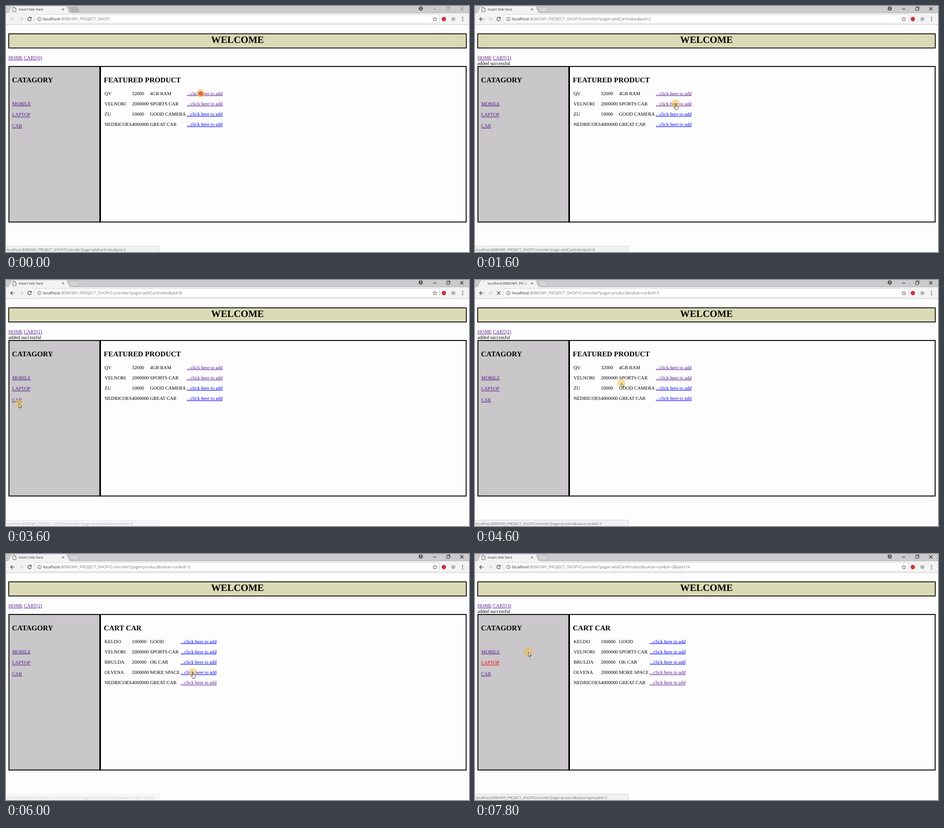
An HTML page for the animation above (8 s loop, 902 by 480 pixels).

```html
<!DOCTYPE html>
<html lang="en">
<head>
<meta charset="utf-8">
<title>Shop demo</title>
<style>
html, body { margin: 0; width: 100%; height: 100%; overflow: hidden; background: #fefdfe; }
svg { display: block; width: 902px; height: 480px; }
text { white-space: pre; text-rendering: geometricPrecision; }
.ui { font-family: "Open Sans", "Noto Sans", sans-serif; }
.page { font: 9.45px "Liberation Serif", "Times New Roman", serif; }
.link { text-decoration: underline; text-decoration-skip-ink: none; }
.h1 { font-size: 18.9px; font-weight: bold; }
.h2 { font-size: 14.15px; font-weight: bold; }
</style>
</head>
<body>
<svg id="stage" viewBox="0 0 902 480" xmlns="http://www.w3.org/2000/svg">
  <defs>
    <linearGradient id="fade">
      <stop offset="0" stop-color="#f4f3f4" stop-opacity="0"/>
      <stop offset="1" stop-color="#f4f3f4"/>
    </linearGradient>
    <clipPath id="tabClip"><rect x="22" y="0" width="82" height="13"/></clipPath>
  </defs>
  <rect width="902" height="480" fill="#fefdfe"/>
  <rect width="902" height="14" fill="#cccacc"/>
  <rect y="13.5" width="902" height="22.5" fill="#f4f3f4"/>
  <path d="M0 13.5H5L11 0H118L124 13.5H902" fill="#f4f3f4" stroke="#aaa8aa" stroke-width=".7"/>
  <path d="M4 14H125" stroke="#f4f3f4" stroke-width="1.5"/>
  <path d="M0 36.4H902" stroke="#c4c2c4" stroke-width=".8"/>
  <rect x="56.5" y="16.7" width="788" height="17" rx="1.5" fill="#fff" stroke="#c9c7c9" stroke-width=".7"/>
  <path d="M109 4.5l4 4m0-4l-4 4" stroke="#444" stroke-width="1"/>
  <g fill="none" stroke="#555" stroke-width="1">
    <circle cx="65" cy="25.5" r="3.6" stroke-width=".9"/>
    <path d="M65 25v2.4M65 23.2v.9"/>
    <path d="M835.500 21.500l1.200 2.700 2.900.3-2.200 1.900.7 2.900-2.600-1.500-2.600 1.500.7-2.900-2.200-1.900 2.900-.3z" stroke-width=".9"/>
  </g>
  <path d="M25 25.500h8m-3.500-3.500l3.500 3.500-3.500 3.500" fill="none" stroke="#d2d0d2" stroke-width="1.1"/>
  <circle cx="853" cy="25.500" r="4.200" fill="#c9333b"/>
  <circle cx="871.500" cy="25.500" r="3.800" fill="#b5b3b5"/>
  <g fill="#555"><circle cx="889.500" cy="22.300" r="1"/><circle cx="889.500" cy="25.500" r="1"/><circle cx="889.500" cy="28.700" r="1"/></g>
  <circle cx="808" cy="5" r="4" fill="#4a4a4a"/>
  <circle cx="808" cy="3.700" r="1.300" fill="#ccc"/>
  <path d="M805.500 7.300q2.500-2 5 0" fill="none" stroke="#ccc"/>
  <g stroke="#000">
    <rect x="5.300" y="54.300" width="891.400" height="27.600" fill="#dadab6" stroke-width="1.600"/>
    <rect x="5.700" y="118" width="177.500" height="303.500" fill="#c9c7c9" stroke-width="1.800"/>
    <rect x="184" y="118" width="712.500" height="303.500" fill="#fefdfe" stroke-width="1.800"/>
    <path d="M183.400 117.200V422.300" stroke-width="3"/>
  </g>
  <g id="live"></g>
</svg>
<script>
const live = document.getElementById('live');
const LOOP = 8000, STEP = 200;
const VISITED = '#551a8b', FRESH = '#0000ee', ACTIVE = '#ff0000';
const HOST = 'localhost', BASE = ':8080/MY_PROJECT_SHOP/', CALL = BASE + 'Controller?page=';

const ADD2 = CALL + 'addCartIndex&pid=2', ADD8 = CALL + 'addCartIndex&pid=8';
const CARS = CALL + 'product&value=car&id=3', LAPTOPS = CALL + 'product&value=laptop&id=2';
const ADD14 = CALL + 'addCartProduct&value=car&id=3&pid=14';
const ADD14_CUT = CALL + 'addCartProduct&value=car&id=3&pid...';

const featured = [
  ['QV', '32000', '4GB RAM'], ['VELNORI', '2000000', 'SPORTS CAR'],
  ['ZU', '10000', 'GOOD CAMERA'], ['NEDRICOES', '4000000', 'GREAT CAR']
];
const cars = [
  ['KELDO', '100000', 'GOOD'], ['VELNORI', '2000000', 'SPORTS CAR'],
  ['BRULDA', '200000', 'OK CAR'], ['OLVENA', '2000000', 'MORE SPACE'],
  ['NEDRICOES', '4000000', 'GREAT CAR']
];

// [request time, ready time, url, cart count, shows message]
const visits = [
  [-1, -1, BASE, 0, false],
  [200, 600, ADD2, 1, true],
  [2000, 2200, ADD8, 2, true],
  [4200, 4800, CARS, 2, false],
  [6400, 6800, ADD14, 3, true]
];

// [time, link under the pointer, opacity]
const hints = [
  [0, ADD2, 1], [800, '', 0], [1000, ADD2, 1], [1200, ADD8, 1],
  [2800, LAPTOPS, 1], [3000, CARS, 1], [3600, CARS, .55], [3800, CARS, 1],
  [4800, '', 0], [6000, ADD14_CUT, .35], [6200, ADD14, 1],
  [6800, '', 0], [7400, LAPTOPS, 1]
];

// [time, x, y]
const path = [
  [0, 379.500, 170.500], [800, 379.500, 170.500], [1200, 391, 190.500], [2000, 391, 190.500],
  [2600, 23, 212], [2800, 22, 214], [3200, 22, 234], [3600, 25, 241], [3800, 22, 235],
  [4200, 22, 235], [4600, 285, 201.500], [4800, 335, 205], [5400, 363, 230],
  [6000, 364, 231], [6600, 364, 231], [7400, 28, 212], [7600, 28, 212], [7800, 104, 191.500]
];
const clicks = [0, 1200, 4000, 6200, 7600];

const last = (list, t) => list.filter(e => e[0] <= t).pop();
const esc = s => s.replace(/&/g, '&amp;');
const text = (x, y, s, attrs = '') => `<text x="${x}" y="${y}" ${attrs}>${esc(s)}</text>`;
const link = (x, y, s, color) => text(x, y, s, `class="link" fill="${color}"`);
const line = (d, color, w = 1.1) => `<path d="${d}" fill="none" stroke="${color}" stroke-width="${w}"/>`;

function pointer(t) {
  const a = last(path, t), b = path.find(p => p[0] > t) || a;
  const k = a === b ? 0 : (t - a[0]) / (b[0] - a[0]);
  return [a[1] + (b[1] - a[1]) * k, a[2] + (b[2] - a[2]) * k];
}

function browser(t, loading, url) {
  const focused = t > 0;
  const ink = focused ? '#333' : '#999';
  const title = loading ? HOST + BASE : 'Insert title here';
  const icon = loading
    ? line('M15.500 4a3.500 3.500 0 0 1 2.500-.6', '#999', 1)
    : '<path d="M13.500 2.500h3.500l2.500 2.500v6h-6z" fill="#fff" stroke="#555" stroke-width=".9"/>' + line('M17 2.500v2.500h2.500', '#555', .8);
  const reload = loading
    ? line('M42.800 22.200l6.500 6.500m0-6.500l-6.500 6.500', '#444', 1.2)
    : line('M49 23.600a3.400 3.400 0 1 0 .3 2.800', '#444', 1.2) + '<path d="M49.800 21.300v3.400h-3.400z" fill="#444"/>';
  return `<g class="ui">
    <path d="M122.500 2H138l5 9.500h-14.500q-2 0-2.800-2z" fill="${focused ? '#d5d3d5' : '#b5b3b5'}" stroke="#aaa8aa" stroke-width=".7"/>
    ${icon}
    <g clip-path="url(#tabClip)">${text(24.500, 9, title, 'font-size="6.75" fill="#333"')}</g>
    ${loading ? '<rect x="90" y="1" width="15" height="11" fill="url(#fade)"/>' : ''}
    ${line('M832 6h6', ink)}${line('M858.500 3h5.500v5.500h-5.500zM860 3v-1.200h5v5', ink, .9)}${line('M885 2.500l6 6m0-6l-6 6', ink)}
    ${line('M17 25.500h-8m3.500-3.500l-3.500 3.500 3.500 3.500', focused ? '#444' : '#d2d0d2')}
    ${reload}
    <text x="72" y="28.300" font-size="7.95" fill="#777"><tspan fill="#222">${HOST}</tspan>${esc(url)}</text>
  </g>`;
}

function page(t, visit) {
  const [, ready, , count, message] = visit;
  const inCars = ready >= 4800;
  const rows = inCars ? cars : featured;
  const seen = i => inCars ? i === 4 || (i === 3 && count === 3) : i < 2;
  const out = [
    text(451, 72.400, 'WELCOME', 'class="h1" text-anchor="middle"'),
    link(4.800, 104, 'HOME', VISITED),
    link(34.800, 104, `CART(${count})`, VISITED),
    message ? text(4.800, 115, 'added successful') : '',
    text(11.800, 148.700, 'CATAGORY', 'class="h2"'),
    text(190.600, 148.700, inCars ? 'CART CAR' : 'FEATURED PRODUCT', 'class="h2"'),
    link(12, 193.700, 'MOBILE', VISITED),
    link(12, 215.300, 'LAPTOP', t >= 7600 ? ACTIVE : VISITED),
    link(12, 236.900, 'CAR', VISITED)
  ];
  rows.forEach(([name, price, note], i) => {
    const y = 173.500 + i * 20.200;
    out.push(text(192, y, name), text(245.300, y, price), text(280.400, y, note),
      link(inCars ? 340.500 : 352.200, y, '...click here to add', seen(i) ? VISITED : FRESH));
  });
  return `<g class="page">${out.join('')}</g>`;
}

function status(t) {
  const [, url, alpha] = last(hints, t);
  if (!url) return '';
  const w = url === ADD14 ? 312 : 299;
  return `<g class="ui" opacity="${alpha}">
    <path d="M-1 468.500H${w - 2}q2 0 2 2V481H-1z" fill="#f2f1f2" stroke="#cccacc" stroke-width=".7"/>
    ${text(1.500, 477.700, HOST + url, 'font-size="6.8" fill="#6c6c6c"')}</g>`;
}

function cursor(t) {
  const [x, y] = pointer(t);
  const onLink = (t < 2200) || (t >= 2600 && t < 3600) || (t >= 3800 && t < 4400) ||
    (t >= 5400 && t < 6800) || (t >= 7400 && t < 7800);
  const pressed = clicks.includes(t);
  const ripple = t < 7600 && clicks.includes(t - STEP);
  const hand = 'M-.8 .5q0-1 .8-1t.8 1v4q3.800 .2 4 2.200v1.800q0 1.500-1.200 3h-4.200q-1-1.800-2.800-4.200 .2-1.500 2.600 .3z';
  const arrow = 'M0 0v8.200l1.900-1.700 1.300 2.900 1.300-.6-1.300-2.800h2.500z';
  const shape = `<path d="${onLink ? hand : arrow}" fill="#fff" stroke="#222" stroke-width=".8"/>`;
  return `<g transform="translate(${x} ${y})">
    <circle r="8.200" fill="#f5c24f" fill-opacity=".55" ${t >= 7800 ? 'stroke="#f08a60" stroke-opacity=".6"' : ''}/>
    ${ripple ? '<circle r="22.500" fill="none" stroke="#f08a60" stroke-opacity=".18"/>' : ''}
    ${pressed ? '<circle r="4.300" fill="#ea4a2c" fill-opacity=".85"/>' : shape}
  </g>`;
}

function draw(t) {
  const asked = last(visits, t);
  const shown = visits.filter(v => v[1] <= t).pop();
  live.innerHTML = browser(t, asked !== shown, asked[2]) + page(t, shown) + status(t) + cursor(t);
}

let drawn = -1;
function tick() {
  const t = Math.floor((performance.now() % LOOP) / STEP) * STEP;
  if (t !== drawn) draw(drawn = t);
  requestAnimationFrame(tick);
}
tick();
</script>
</body>
</html>
```
